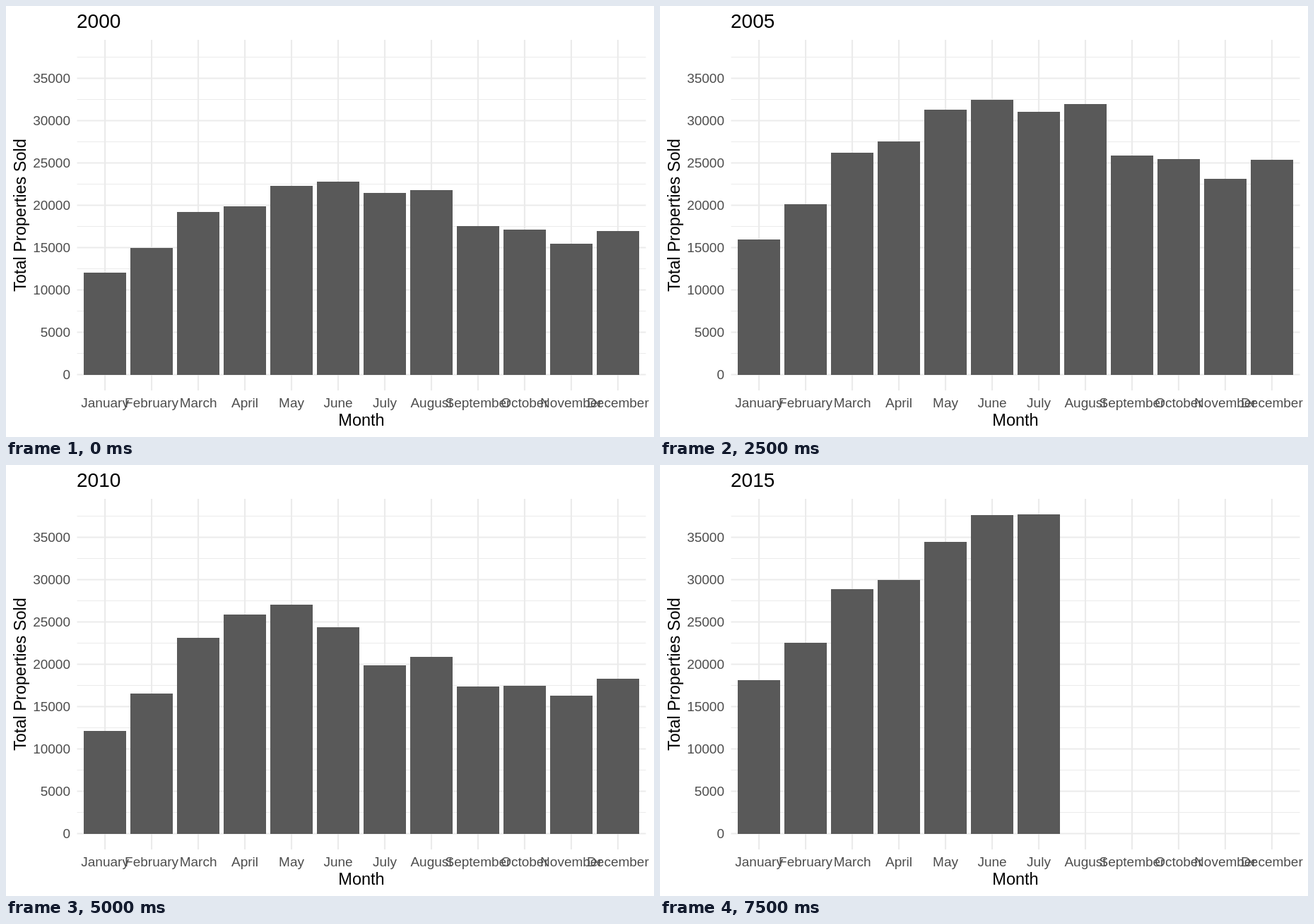
Recreate the animation shown at these times as an HTML page with a canvas. Size 917 by 611 pixels, loop 8000 ms.

```html
<!DOCTYPE html>
<html lang="en">
<head>
<meta charset="utf-8">
<title>Total Properties Sold</title>
<style>
  html, body { margin: 0; width: 100%; height: 100%; overflow: hidden; background: #fff; }
  canvas { display: block; }
</style>
</head>
<body>
<canvas id="chart" width="917" height="611"></canvas>
<script>
const ctx = document.getElementById('chart').getContext('2d');
const MONTHS = ['January', 'February', 'March', 'April', 'May', 'June', 'July',
  'August', 'September', 'October', 'November', 'December'];
const FIRST = 2000, YEARS = 16, STEP = 500;
const LAST_MONTH = 15 * 12 + 6;
const PANEL = { left: 100.5, right: 905.5, top: 48, bottom: 545.1 };
const ZERO = 522.5, SCALE = 0.012;
const UNIT = (PANEL.right - PANEL.left) / 12.2;

// Sales = seasonal factor of the month * market level in thousands
const SEASON = [0.65, 0.81, 1.04, 1.08, 1.21, 1.24, 1.17, 1.19, 0.96, 0.94, 0.85, 0.93];

// Turning points of the market: [years since FIRST, level]
const TREND = [
  [0, 18.5], [0.9, 18.2], [2, 21.5], [2.2, 18.8], [2.9, 20], [3.3, 20],
  [5, 24.5], [5.6, 26.9], [6, 27.4], [6.3, 29.2], [7, 29.4],
  [8, 26.3], [8.2, 23.8], [8.5, 23.9], [8.9, 19], [9.25, 18.8], [9.8, 22.5],
  [10, 18.7], [10.27, 24.4], [10.5, 17], [11, 20.2], [12, 21.7],
  [12.8, 25.7], [13.4, 29], [14, 27.8], [14.9, 30], [15, 27.9], [15.3, 27.7], [15.5, 32.2]
];

const yOf = v => ZERO - v * SCALE;
const xOf = i => PANEL.left + UNIT * (0.6 + i);

function level(t) {
  const next = Math.max(1, TREND.findIndex(([at]) => at >= t));
  const [t0, a] = TREND[next - 1], [t1, b] = TREND[next];
  return a + (b - a) * (t - t0) / (t1 - t0);
}

function line(x1, y1, x2, y2, width) {
  ctx.lineWidth = width;
  ctx.beginPath();
  ctx.moveTo(x1, y1);
  ctx.lineTo(x2, y2);
  ctx.stroke();
}

function text(str, x, y, size, align, color) {
  ctx.font = size + 'px "Liberation Sans", Arial, sans-serif';
  ctx.textAlign = align;
  ctx.fillStyle = color;
  ctx.fillText(str, x, y);
}

function drawGrid() {
  ctx.strokeStyle = '#ebebeb';
  for (let v = 0; v <= 37500; v += 2500) {
    line(PANEL.left, yOf(v), PANEL.right, yOf(v), v % 5000 ? 1.11 : 2.22);
  }
  MONTHS.forEach((_, i) => line(xOf(i), PANEL.top, xOf(i), PANEL.bottom, 2.22));
}

function drawBars(year) {
  ctx.fillStyle = '#595959';
  const bottom = Math.round(ZERO);
  SEASON.forEach((factor, i) => {
    const month = (year - FIRST) * 12 + i;
    if (month > LAST_MONTH) return;
    const left = Math.round(xOf(i) - UNIT * 0.45);
    const right = Math.round(xOf(i) + UNIT * 0.45);
    const top = Math.round(yOf(factor * level(month / 12) * 1000));
    ctx.fillRect(left, top, right - left, bottom - top);
  });
}

function drawLabels(year) {
  const midX = (PANEL.left + PANEL.right) / 2;
  const midY = (PANEL.top + PANEL.bottom) / 2;
  for (let v = 0; v <= 35000; v += 5000) {
    text(v, 91, yOf(v) + 6.5, 19, 'right', '#4d4d4d');
  }
  MONTHS.forEach((m, i) => text(m, xOf(i), 568.6, 19, 'center', '#4d4d4d'));
  text('Month', midX, 595, 23.5, 'center', '#000');
  text(year, 100, 31, 28, 'left', '#000');
  ctx.save();
  ctx.translate(28, midY);
  ctx.rotate(-Math.PI / 2);
  text('Total Properties Sold', 0, 0, 23.5, 'center', '#000');
  ctx.restore();
}

function draw(year) {
  ctx.fillStyle = '#fff';
  ctx.fillRect(0, 0, 917, 611);
  drawGrid();
  drawBars(year);
  drawLabels(year);
}

const start = performance.now();
let shown = 0;
function tick() {
  const time = Math.max(0, performance.now() - start);
  const year = FIRST + Math.floor(time / STEP) % YEARS;
  if (year !== shown) draw(shown = year);
  requestAnimationFrame(tick);
}
tick();
</script>
</body>
</html>
```
